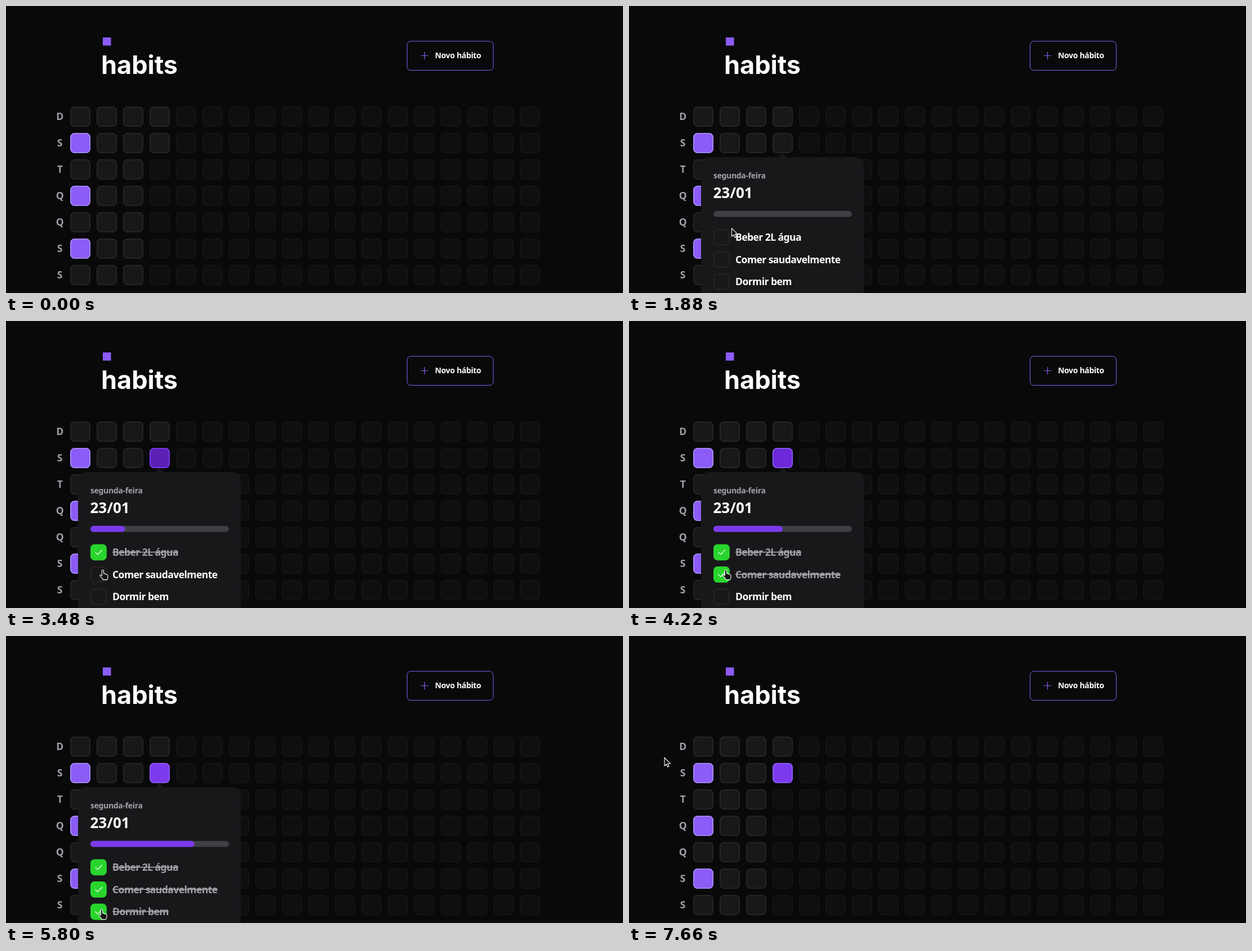
Animation of 1096 by 511 pixels, one loop 8 s. Source, as an HTML page:

```html
<!DOCTYPE html>
<html lang="pt-BR">
<head>
<meta charset="utf-8">
<title>habits</title>
<style>
  html, body { margin: 0; width: 100%; height: 100%; overflow: hidden; background: #09090a; }
  svg { display: block; width: 100%; height: 100%; }
  text { font-family: "Noto Sans", sans-serif; font-weight: 600; fill: #fff; }
  .brand { font: 700 45px Inter, sans-serif; }
  .day { font-size: 17.5px; font-weight: 700; fill: #a1a1aa; text-anchor: middle; }
  .small { font-size: 14px; letter-spacing: -.33px; }
  .muted { fill: #a1a1aa; }
  .date { font-size: 26px; font-weight: 800; }
  .item { font-size: 17.5px; letter-spacing: -.55px; }
  .done { fill: #a1a1aa; text-decoration: line-through; }
  .line { fill: none; stroke-linecap: round; stroke-linejoin: round; }
  .cursor { fill: #111; stroke: #fff; stroke-width: 1.1; stroke-linejoin: round; }
</style>
</head>
<body>
<svg id="stage" viewBox="0 0 1096 511"></svg>
<script>
const LOOP = 8000;
const OPEN = 1150, ITEMS = 1290, CLOSE = 7370;
const CLICKS = [2820, 4090, 5640];
const HABITS = ['Beber 2L água', 'Comer saudavelmente', 'Dormir bem'];
const PITCH = 47, GRID_X = 114, GRID_Y = 179, CELL = 36;
const CHECK_Y = 397.4, CHECK_STEP = 39.6, CHECK_SIZE = 28.8;
const BAR_WIDTH = 246;
const EMPTY = ['#18181b', '#27272a'];
const FULL = ['#8b5cf6', '#a78bfa'];
const LEVELS = [EMPTY, ['#5b21b6', '#7c3aed'], ['#6d28d9', '#8b5cf6'], ['#7c3aed', '#8b5cf6']];
const GREEN = '#29d52d';

// time, x, y of the pointer's hot spot
const PATH = [
  [280, 214, 199], [400, 243, 226], [520, 260, 243], [640, 265, 248],
  [1560, 265, 248], [1640, 247, 279], [1760, 206, 350], [1880, 182, 395],
  [2000, 170, 406], [2160, 166, 409],
  [3000, 166, 409], [3200, 168, 425], [3360, 171, 440], [3480, 172, 443],
  [4470, 172, 443], [4640, 175, 464], [4800, 170, 484], [4900, 168, 489], [4990, 170, 487],
  [6520, 170, 487], [6660, 183, 469], [6800, 136, 428], [6970, 61, 378],
  [7110, 3, 362], [7330, 63, 346],
  [7370, 63, 346], [7480, 64, 270], [7580, 63, 226], [7660, 62.5, 216]
];

const stage = document.getElementById('stage');

function add(parent, tag, attrs = {}, content = '') {
  const el = document.createElementNS('http://www.w3.org/2000/svg', tag);
  for (const key in attrs) el.setAttribute(key, attrs[key]);
  el.textContent = content;
  return parent.appendChild(el);
}

const label = (parent, x, y, cls, content) => add(parent, 'text', { x, y, class: cls }, content);

// Rounded box whose border lies inside its edges
function box(parent, x, y, w, h, r, [fill, stroke], border = 1.8) {
  return add(parent, 'rect', {
    x: x + border / 2, y: y + border / 2, width: w - border, height: h - border,
    rx: r - border / 2, fill, stroke, 'stroke-width': border
  });
}

const show = (el, visible) => el.setAttribute('visibility', visible ? 'inherit' : 'hidden');
const mix = (a, b, p) => `color-mix(in srgb, ${b} ${p * 100}%, ${a})`;
const solidColumns = row => row < 2 ? 4 : 3;

// Header
add(stage, 'rect', { x: 172, y: 56, width: 14.5, height: 14.5, fill: '#8b5cf6' });
label(stage, 169, 121, 'brand', 'habits');
box(stage, 712, 62.3, 154, 52.7, 7.2, ['none', '#8b5cf6'], 1);
add(stage, 'path', { d: 'M737.3 88.5h12.4M743.5 82.3v12.4', class: 'line', stroke: '#8b5cf6', 'stroke-width': 1.2 });
label(stage, 762, 93, 'small', 'Novo hábito');

// Calendar
let today;
[...'DSTQQSS'].forEach((day, row) => {
  const y = GRID_Y + row * PITCH;
  label(stage, 95.7, y + 24.4, 'day', day);
  for (let col = 0; col < 18; col++) {
    const colors = col === 0 && row % 2 ? FULL : EMPTY;
    const cell = box(stage, GRID_X + col * PITCH, y, CELL, CELL, 7.6, colors);
    if (col >= solidColumns(row)) cell.setAttribute('opacity', .4);
    if (row === 1 && col === 3) today = cell;
  }
});

// Popover
const popover = add(stage, 'g');
const panel = add(popover, 'rect', { x: 128, y: 269, width: 289, rx: 14.4, fill: '#18181b' });
add(popover, 'path', { d: 'M264.5 269.5L272.8 262L281 269.5z', fill: '#18181b' });
label(popover, 150, 307, 'small muted', 'segunda-feira');
label(popover, 149.5, 342.3, 'date', '23/01');
const barAttrs = { x: 150, y: 364.8, width: BAR_WIDTH, height: 10.8, rx: 5.4 };
add(popover, 'rect', { ...barAttrs, fill: '#3f3f46' });
const bar = add(popover, 'rect', { ...barAttrs, fill: '#7c3aed' });

const list = add(popover, 'g');
const items = HABITS.map((name, i) => {
  const y = CHECK_Y + i * CHECK_STEP;
  const check = box(list, 150, y, CHECK_SIZE, CHECK_SIZE, 7.2, EMPTY);
  const tick = add(list, 'path', {
    d: `M158.8 ${y + 14.4}l3.9 3.9 7.9-7.8`, class: 'line', stroke: '#fff', 'stroke-width': 1.2
  });
  return { check, tick, text: label(list, 189, y + 20.5, 'item', name) };
});

// Pointer
const pointer = add(stage, 'g', { class: 'cursor' });
const arrow = add(pointer, 'path', { d: 'M.5 .5V15.3l3.4-3.1 2.2 5 2.3-1-2.2-4.9h4.8z' });
const hand = add(pointer, 'path', {
  d: 'M-1.7 10.5V1.8a1.6 1.6 0 0 1 3.2 0V6.8q2.2-.8 2.6.9q2-.7 2.5.9q2.2-.3 2.4 1.6V13' +
     'q0 2-1.3 3.2V17.6H-.2V16.2L-4.8 11.2q-1-1.6.6-2.2q1.4-.2 2.5 1.5z'
});

function pointerAt(t) {
  const i = PATH.findIndex(point => point[0] > t);
  if (i < 0) return PATH[PATH.length - 1].slice(1);
  const [t0, x0, y0] = PATH[i - 1], [t1, x1, y1] = PATH[i];
  const p = (t - t0) / (t1 - t0);
  return [x0 + (x1 - x0) * p, y0 + (y1 - y0) * p];
}

function overButton(x, y, popoverOpen) {
  if (popoverOpen && x > 128 && x < 417 && y > 269) {
    const dy = y - CHECK_Y;
    return x > 150 && dy >= 0 && dy % CHECK_STEP < CHECK_SIZE;
  }
  const col = (x - GRID_X) / PITCH, row = (y - GRID_Y) / PITCH;
  return col >= 0 && row >= 0 && col < solidColumns(Math.floor(row)) &&
    col % 1 < CELL / PITCH && row % 1 < CELL / PITCH;
}

// A click settles in three short steps
const settled = (t, click) => t < click ? 0 : Math.min(1, (Math.floor((t - click) / 65) + 1) / 3);

function draw(t) {
  const open = t >= OPEN && t < CLOSE;
  show(popover, open);
  show(list, t >= ITEMS);
  panel.setAttribute('height', t >= ITEMS ? 300 : 150);

  let progress = 0;
  items.forEach(({ check, tick, text }, i) => {
    const p = settled(t, CLICKS[i]);
    progress += p;
    check.style.fill = mix(EMPTY[0], GREEN, p);
    check.style.stroke = mix(EMPTY[1], GREEN, p);
    show(tick, p > 0);
    text.classList.toggle('done', p > 0);
  });
  bar.setAttribute('width', BAR_WIDTH * progress / 4);

  const from = LEVELS[Math.floor(progress)], to = LEVELS[Math.ceil(progress)];
  today.style.fill = mix(from[0], to[0], progress % 1);
  today.style.stroke = mix(from[1], to[1], progress % 1);

  const visible = t >= PATH[0][0];
  show(pointer, visible);
  if (!visible) return;
  const [x, y] = pointerAt(t);
  const isHand = overButton(x, y, open);
  pointer.setAttribute('transform', `translate(${x} ${y})`);
  show(hand, isHand);
  show(arrow, !isHand);
}

const start = performance.now();
function tick() {
  draw((performance.now() - start) % LOOP);
  requestAnimationFrame(tick);
}
draw(0);
tick();
</script>
</body>
</html>
```
